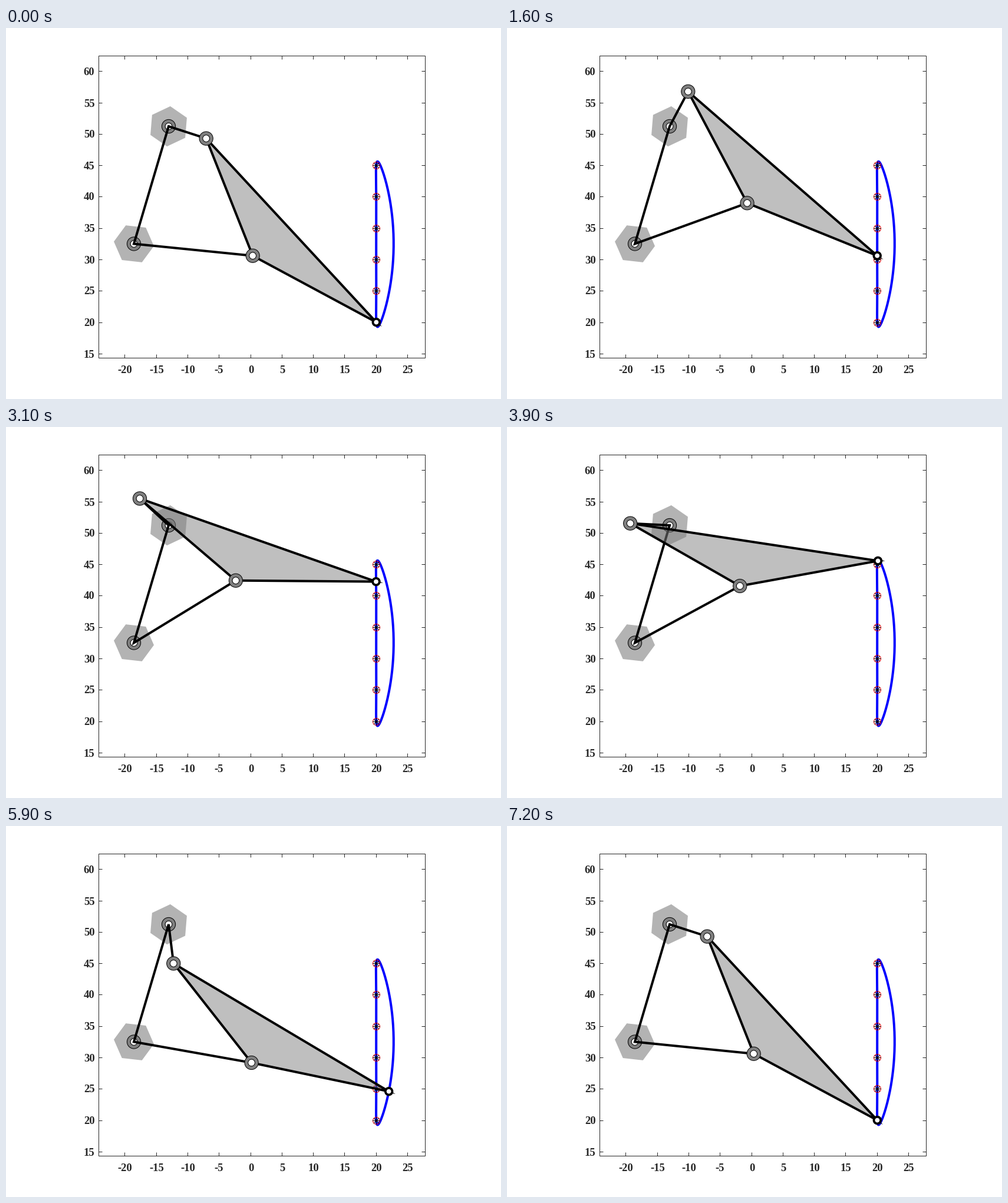
A matplotlib script for the animation above (7300 ms loop, 840x630 px).

```python
import numpy as np
import matplotlib.pyplot as plt
from matplotlib.animation import FuncAnimation
from matplotlib.patches import Circle, Polygon, Rectangle, RegularPolygon

W, H, DPI = 840, 630, 100
PX = 72 / DPI                      # one pixel in points
FRAMES, INTERVAL = 73, 100
INK = "0.15"

# Linkage geometry in stage pixels, y pointing down
A = np.array([276.0, 167.0])       # crank pivot
B = np.array([217.0, 366.5])       # rocker pivot
CRANK, ROCKER, COUPLER = 66.9, 202.7, 214.3
REACH_C, REACH_D = 425.1, 238.1    # from coupler joints to the tracing point
START = -17.9                      # crank angle in degrees


def meet(p, q, rp, rq, side):
    """Point at distance rp from p and rq from q, on the chosen side."""
    d = np.hypot(*(q - p))
    u = (q - p) / d
    a = (rp**2 - rq**2 + d**2) / (2 * d)
    h = np.sqrt(rp**2 - a**2)
    return p + a * u + side * h * np.array([-u[1], u[0]])


def pose(turn):
    t = np.radians(START + turn)
    c = A + CRANK * np.array([np.cos(t), -np.sin(t)])
    d = meet(B, c, ROCKER, COUPLER, 1)
    p = meet(c, d, REACH_C, REACH_D, -1)
    return c, d, p


# Data values to the centre of the pixel they fall in
def px_x(v):
    return np.floor(415 + 10.665 * v) + 0.5


def px_y(v):
    return np.floor(713.3 - 10.66 * v) + 0.5


fig = plt.figure(figsize=(W / DPI, H / DPI), dpi=DPI, facecolor="white")
ax = fig.add_axes([0, 0, 1, 1])
ax.set_xlim(0, W)
ax.set_ylim(H, 0)
ax.axis("off")


def line(xs, ys, color, width, z, **kw):
    return ax.plot(xs, ys, color=color, lw=width * PX, zorder=z, snap=False, **kw)[0]


def disc(center, r, face, width, z, edge="black"):
    return ax.add_patch(Circle(center, r, fc=face, ec=edge, lw=width * PX, zorder=z))


def joint(center, z):
    return [disc(center, 11.6, "0.5", 1, z), disc(center, 5.8, "white", 1, z + 0.1)]


def draw_frame():
    left, right, top, bottom = 157.5, 711.5, 47.5, 560.5
    tick = 5.5
    ax.add_patch(Rectangle((left, top), right - left, bottom - top, fill=False,
                           ec=INK, lw=PX, zorder=1, snap=False))
    font = dict(family="Liberation Serif", weight="bold", size=18.67 * PX,
                color=INK, va="baseline")
    for v in range(-20, 26, 5):
        x = px_x(v)
        line([x, x], [bottom, bottom - tick], INK, 1, 1)
        line([x, x], [top, top + tick], INK, 1, 1)
        ax.text(x, 586, str(v), ha="center", **font)
    for v in range(15, 61, 5):
        y = px_y(v)
        line([left, left + tick], [y, y], INK, 1, 1)
        line([right, right - tick], [y, y], INK, 1, 1)
        ax.text(150.5, y + 6, str(v), ha="right", **font)


def draw_targets():
    x = px_x(20)
    for v in range(20, 46, 5):
        y = px_y(v)
        disc((x, y), 6, "none", 1, 3, edge="red")
        for dx, dy in ((6, 0), (0, 6), (4, 4), (4, -4)):
            line([x - dx, x + dx], [y - dy, y + dy], "black", 1, 3.1)


draw_frame()
trace = np.array([pose(a)[2] for a in range(361)])
line(trace[:, 0], trace[:, 1], "blue", 4, 2)
draw_targets()

for pivot, ang in ((A, 25.3), (B, -6.4)):
    ax.add_patch(RegularPolygon(pivot, 6, radius=34.2, fc="0.7", ec="none",
                                orientation=np.radians(-ang - 90), zorder=4))
    joint(pivot, 5)

links = line([], [], "black", 4, 6, solid_joinstyle="miter", solid_capstyle="butt")
plate = ax.add_patch(Polygon(np.zeros((3, 2)), fc="0.5", ec="none", alpha=0.5, zorder=7))
rim = ax.add_patch(Polygon(np.zeros((3, 2)), fill=False, ec="black", lw=4 * PX, zorder=8))
spike = ax.add_patch(Polygon(np.zeros((3, 2)), fc="black", ec="none", zorder=8))
joint_c = joint((0, 0), 9)
joint_d = joint((0, 0), 9)
tracer = disc((0, 0), 5.8, "white", 3.8, 10)


def spike_points(c, d, p):
    """Sharp mitred corner of the plate's rim at the tracing point."""
    uc, ud = (p - c) / REACH_C, (p - d) / REACH_D
    out = (uc + ud) / np.hypot(*(uc + ud))
    side = np.array([-out[1], out[0]])
    half = np.arccos(np.dot(uc, ud)) / 2
    return [p + 2 * side, p + out * 2 / np.sin(half), p - 2 * side]


def update(i):
    c, d, p = pose(360 * i / (FRAMES - 1))
    links.set_data(*np.array([c, A, B, d]).T)
    plate.set_xy([c, d, p])
    rim.set_xy([c, d, p])
    spike.set_xy(spike_points(c, d, p))
    for parts, center in ((joint_c, c), (joint_d, d), ([tracer], p)):
        for part in parts:
            part.center = center
    return links, plate, rim, spike, *joint_c, *joint_d, tracer


anim = FuncAnimation(fig, update, frames=FRAMES, interval=INTERVAL,
                     repeat=True, repeat_delay=0, blit=False)
plt.show()
```
